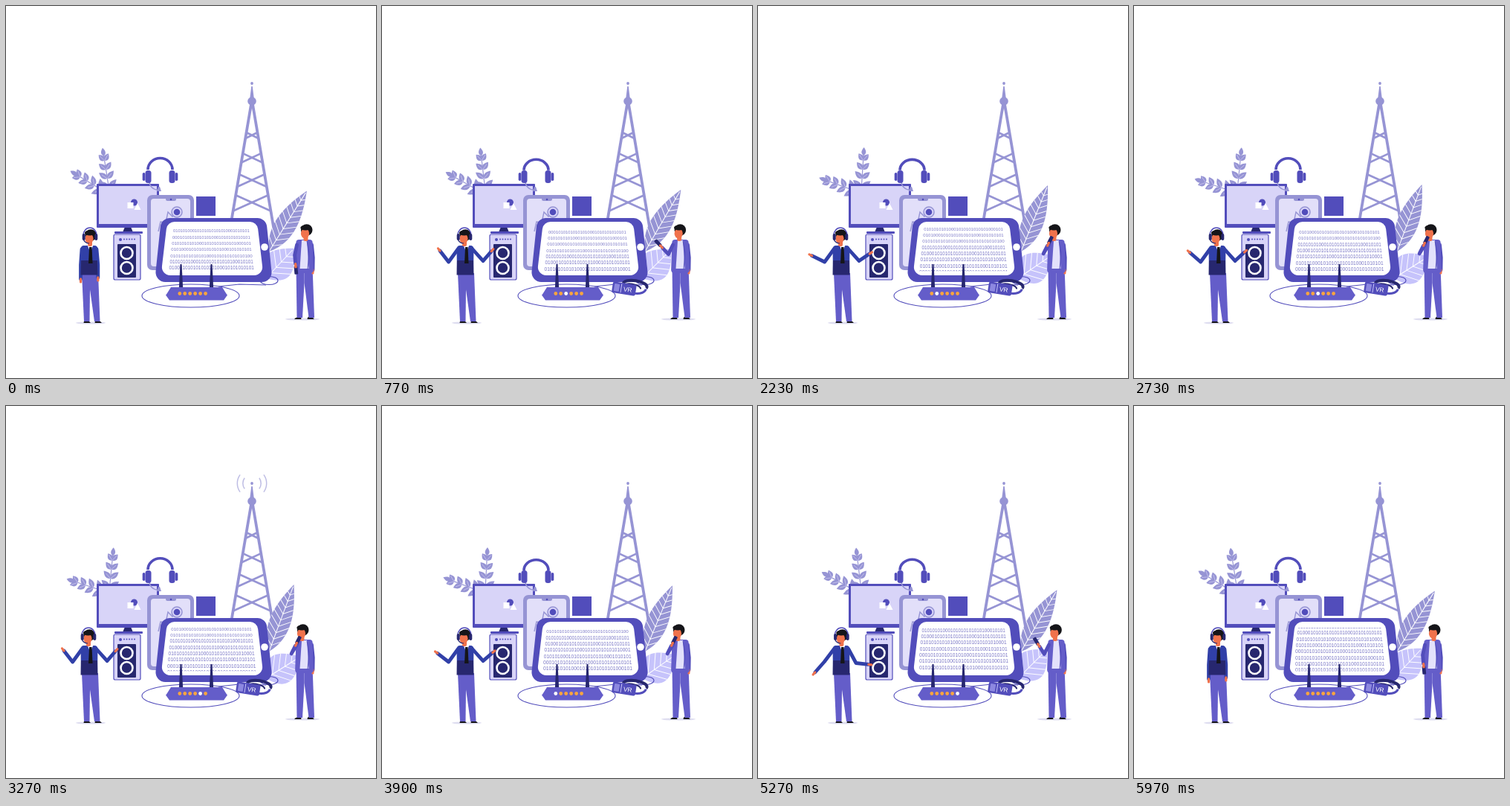
An HTML page with a canvas for the animation above (6.01 s loop, 498 by 500 pixels).

```html
<!DOCTYPE html>
<html lang="en">
<head>
<meta charset="utf-8">
<title>Devices</title>
<style>
html, body { margin: 0; width: 100%; height: 100%; overflow: hidden; background: #fff; }
canvas { display: block; }
</style>
</head>
<body>
<canvas id="stage" width="498" height="500"></canvas>
<script>
const ctx = document.getElementById('stage').getContext('2d');
const LOOP = 6010, TAU = Math.PI * 2, RAD = Math.PI / 180;
const C = {
  main: '#524dbb', mid: '#9694d4', soft: '#d8d4f8', pale: '#c6c3fb', navy: '#27276f',
  suit: '#645dc9', blue: '#3140a8', skin: '#f0724c', hair: '#151519', lamp: '#f9a53f', white: '#fff'
};

// ---- drawing helpers
function paint(fill, stroke, width = 1) {
  if (fill) { ctx.fillStyle = fill; ctx.fill(); }
  if (stroke) { ctx.strokeStyle = stroke; ctx.lineWidth = width; ctx.stroke(); }
}
function poly(pts, fill, stroke, width, open) {
  ctx.beginPath();
  pts.forEach(([x, y], i) => i ? ctx.lineTo(x, y) : ctx.moveTo(x, y));
  if (!open) ctx.closePath();
  paint(fill, stroke, width);
}
const line = (pts, color, width) => poly(pts, null, color, width, true);
// upright shape, w1 wide at y1 and w2 wide at y2
const taperPts = (x, y1, w1, y2, w2) =>
  [[x - w1 / 2, y1], [x + w1 / 2, y1], [x + w2 / 2, y2], [x - w2 / 2, y2]];
const taper = (x, y1, w1, y2, w2, fill) => poly(taperPts(x, y1, w1, y2, w2), fill);
function oval(x, y, rx, ry, fill, stroke, width) {
  ctx.beginPath();
  ctx.ellipse(x, y, rx, ry, 0, 0, TAU);
  paint(fill, stroke, width);
}
const dot = (x, y, r, fill, stroke, width) => oval(x, y, r, r, fill, stroke, width);
function arc(x, y, rx, ry, a, b, color, width) {
  ctx.beginPath();
  ctx.ellipse(x, y, rx, ry, 0, a, b);
  paint(null, color, width);
}
function box(x, y, w, h, r, fill, stroke, width) {
  ctx.beginPath();
  ctx.roundRect(x, y, w, h, r);
  paint(fill, stroke, width);
}
function roundPoly(pts, r, fill) {
  const n = pts.length, last = pts[n - 1];
  ctx.beginPath();
  ctx.moveTo((last[0] + pts[0][0]) / 2, (last[1] + pts[0][1]) / 2);
  pts.forEach((p, i) => {
    const q = pts[(i + 1) % n];
    ctx.arcTo(p[0], p[1], q[0], q[1], r);
  });
  ctx.closePath();
  paint(fill);
}
function at(x, y, deg, draw, scale = 1) {
  ctx.save();
  ctx.translate(x, y);
  ctx.rotate(deg * RAD);
  ctx.scale(scale, scale);
  draw();
  ctx.restore();
}

// ---- timing helpers
const clamp = v => Math.min(1, Math.max(0, v));
const ease = (t, from, to) => (1 - Math.cos(Math.PI * clamp((t - from) / (to - from)))) / 2;
const raised = (t, up, top, down, rest) => ease(t, up, top) - ease(t, down, rest);

// ---- plants
function blade(len, half, color, step) {
  ctx.beginPath();
  ctx.moveTo(0, 0);
  ctx.bezierCurveTo(-half * 1.6, -len * 0.3, -half, -len * 0.65, 0, -len);
  ctx.bezierCurveTo(half, -len * 0.65, half * 1.6, -len * 0.3, 0, 0);
  paint(color);
  if (!step) return;
  ctx.save();
  ctx.clip();
  line([[0, 0], [0, 3 - len]], C.white, 1);
  for (let y = step; y < len - step; y += step)
    line([[-half * 1.1, -y - half * 0.9], [0, -y], [half * 1.1, -y - half * 0.9]], C.white, 0.9);
  ctx.restore();
}
function branch(x, y, deg, len) {
  at(x, y, deg, () => {
    line([[0, 0], [0, 6 - len]], C.mid, 1.2);
    for (let i = 0; i < 4; i++)
      for (const s of [-1, 1])
        at(0, -4 - i * len * 0.21, s * (52 - i * 5), () => {
          blade(15 - i * 1.3, 3.6, C.mid);
          line([[0, 0], [0, -9]], C.soft, 0.6);
        });
    at(0, 11 - len, 0, () => blade(11, 3, C.mid));
  });
}

// ---- devices
function tower() {
  const reach = y => (y - 132) * 0.17 + 1;
  taper(331, 108, 1.5, 126, 6, C.mid);
  dot(331, 104, 1.9, C.mid);
  dot(331, 128, 5.8, C.mid);
  for (const s of [-1, 1]) {
    line([[331 + s, 132], [331 + s * reach(300), 300]], C.mid, 3.8);
    for (let k = 0; k < 4; k++) {
      const y = 174 + 30.3 * k, h = 4 + 2.2 * k;
      line([[331 - s * reach(y - h), y - h], [331 + s * reach(y + h), y + h]], C.mid, 2.6);
    }
  }
}
function signal(t) {
  const p = (t % (LOOP / 4)) / 700;
  const r = 32 * (1 - (1 - p) ** 2);
  if (p >= 1 || r < 3) return;
  ctx.globalAlpha = 1 - p;
  for (const k of [0.62, 1])
    for (const mid of [0, Math.PI])
      arc(331, 104, r * k, r * k, mid - 0.63, mid + 0.63, C.mid, 1.5);
  ctx.globalAlpha = 1;
}
function headphones(t) {
  const dy = 1.75 * (1 - Math.cos(2 * TAU * t / LOOP));
  arc(204, 236, 11, 11, Math.PI / 2, Math.PI, C.mid, 1.5);
  taper(206, 243, 2, 249, 6, C.mid);
  arc(207.5, 220 + dy * 0.4, 16.5, 15.5 - dy * 0.6, Math.PI, TAU, C.main, 3.6);
  for (const s of [-1, 1]) {
    const x = 207.5 + s * 16;
    box(x - 4, 221, 8, 17, 3.5, C.main);
    box(x + s * 6 - 1.8, 224, 3.6, 11, 1.8, C.main);
  }
}
function monitor() {
  taper(164, 297, 8, 304, 14, C.navy);
  box(146, 303, 38, 3, 1, C.main);
  box(122, 239, 84, 59, 1, C.main);
  box(125, 242, 78, 51, 0, C.soft);
  dot(172.5, 264, 4.5, C.main);
  box(163.5, 264, 8, 8, 0, C.white);
  taper(177, 265, 0, 274, 9, C.white);
}
function speaker() {
  box(145, 307, 36, 61, 2, C.soft, C.main, 1.2);
  dot(154, 314, 2, C.main);
  for (let x = 159; x < 175; x += 3.5) dot(x, 313.5, 1, C.main);
  box(150, 320, 25, 45, 1, C.navy);
  for (const y of [332, 352]) dot(162.5, y, 8, C.navy, C.white, 2.6);
}
function slimPhone() {
  box(190, 254, 63, 101, 7, C.mid);
  box(195, 259, 53, 91, 4, '#e2dff9');
  box(215, 257, 14, 5, 3, C.mid);
  dot(222, 260, 1.3, C.main);
  line([[205, 303], [208, 290], [215, 291], [218, 277], [224, 283], [230, 277]], C.mid, 1.4);
  dot(230, 277, 7, C.soft, C.mid, 1.5);
  dot(230, 277, 4.3, C.main);
}
const bits = '0101010001010101'.repeat(4);
function tablet(t) {
  roundPoly(taperPts(279.5, 285, 141, 371, 159), 13, C.main);
  roundPoly(taperPts(277.5, 290, 121, 362, 138), 11, C.white);
  dot(348, 324, 4.8, C.white);
  const s = t / 1000, scroll = 9 * s - 0.19 * s * s;
  ctx.save();
  ctx.beginPath();
  ctx.rect(214, 298, 128, 58.5);
  ctx.clip();
  ctx.fillStyle = '#7a77c6';
  ctx.textBaseline = 'middle';
  ctx.textAlign = 'left';
  for (let k = 0; k < 14; k++) {
    const u = k * 8.3;
    const x = Math.max(217, 225 - u * 0.11), end = Math.min(337.5, 328 + u * 0.12);
    ctx.font = (end - x) / 17.8 + 'px "Liberation Sans", Arial, sans-serif';
    ctx.fillText(bits.substr(k * 6 % 16, 32), x, 302.6 + u - scroll);
  }
  ctx.restore();
}
function cable() {
  oval(248.5, 389.5, 65.5, 15.5, null, C.main, 1.1);
  line([[286, 377], [314, 374], [350, 375]], C.main, 1.1);
  oval(354, 369, 12, 5.5, null, C.main, 1.1);
}
function router(t) {
  for (const x of [235.5, 276.5]) taper(x, 347, 2, 378, 5.2, C.navy);
  taper(256.5, 378, 69, 389, 83, C.suit);
  taper(256.5, 388.5, 83, 395.5, 73, C.suit);
  const lit = t > 60 && t < 5508 ? Math.floor(t / 306) % 6 : -1;
  for (let i = 0; i < 6; i++) dot(233.8 + i * 6.95, 386.5, 2.4, i === lit ? C.white : C.lamp);
}
function headset(t) {
  if (t < 25) return;
  at(326, 379, 9, () => {
    arc(14, -6, 16, 6, Math.PI, TAU + 0.3, C.navy, 4);
    arc(14, -3, 15, 8, 0, Math.PI / 2, C.main, 3);
    arc(10, -2, 12, 5, Math.PI, TAU, C.navy, 2);
    box(-16, -6.5, 32, 15, 2.5, C.main);
    box(-13.5, -4, 7, 10, 1, '#8d88e0');
    line([[-4, -5], [-4, 7]], C.pale, 1);
    ctx.fillStyle = C.white;
    ctx.font = '8.5px "Liberation Sans", Arial, sans-serif';
    ctx.textAlign = 'center';
    ctx.textBaseline = 'middle';
    ctx.fillText('VR', 5, 2);
  }, ease(t, -300, 300));
}

// ---- people
// arm angles run from straight down, outward positive; side -1 is the viewer's left
function arm(x, y, side, up, low, lenUp, lenLow, color) {
  const step = (p, deg, len) => [p[0] + side * Math.sin(deg * RAD) * len, p[1] + Math.cos(deg * RAD) * len];
  const elbow = step([x, y], up, lenUp), wrist = step(elbow, low, lenLow), hand = step(wrist, low, 4);
  ctx.lineCap = ctx.lineJoin = 'round';
  line([[x, y], elbow, wrist], color, 4.8);
  line([wrist, hand], C.skin, 3.2);
  ctx.lineCap = 'butt';
  ctx.lineJoin = 'miter';
  return hand;
}
function head(x, y) {
  box(x - 3, y + 3, 6, 9, 2, C.skin);
  oval(x + 1.2, y - 3, 7.8, 7.8, C.hair);
  oval(x - 1, y + 1.8, 5.6, 6.8, C.skin);
  oval(x - 0.4, y - 6, 6.8, 3.6, C.hair);
}
function legs(x, top, bottom, stance) {
  const half = 11, foot = 7.5;
  for (const s of [-1, 1]) {
    const heel = s < 0 ? x - half + 3 - stance : x + half - 5;
    poly([[x, top], [x + s * half, top], [heel + foot * (s > 0), bottom],
      [heel + foot * (s < 0 ? 1 : 0) - (s > 0 ? 0 : 0), bottom], [heel + foot * (s < 0), bottom], [x, top + 22]], C.suit);
  }
}
function shoe(x, y, dir) {
  ctx.beginPath();
  ctx.moveTo(x - 3.5 * dir, y);
  ctx.quadraticCurveTo(x - 3 * dir, y - 5, x + dir, y - 3);
  ctx.quadraticCurveTo(x + 5 * dir, y - 2, x + 6 * dir, y);
  paint(C.hair);
}
function agent(t) {
  const up = raised(t, 60, 700, 4150, 5950), out = up ** 0.4;
  const wave = Math.cos(TAU * (t - 770) / 2500);
  oval(114, 426, 20, 1.6, '#deddf0');
  shoe(108, 426, 1);
  shoe(123, 426, 1);
  legs(113, 359, 424, 0);
  roundPoly(taperPts(112, 322, 23, 361, 22), 4, C.blue);
  arm(102, 327, -1, 4 + 32 * up + 28 * Math.sin(Math.PI * up), (128 + 14 * wave) * up, 21, 19, C.blue);
  arm(122, 327, 1, 5 + 37 * out, (131 + 8 * wave) * out, 21, 17, C.blue);
  taper(112, 342, 22, 361.5, 23, C.navy);
  taper(113.5, 320, 9, 330, 1, C.white);
  taper(113.8, 324, 3.5, 346, 5.5, C.hair);
  const x = 113 - 2 * up;
  head(x, 311);
  arc(x, 308, 9, 10, Math.PI, TAU, C.main, 1.5);
  for (const s of [-1, 1]) box(x + s * 8.3 - 2, 306, 4, 9, 2, C.navy);
  arc(x - 1, 313, 7.5, 6, Math.PI / 2, Math.PI, C.navy, 1.2);
}
function caller(t) {
  const up = raised(t, 100, 1200, 4900, 5950);
  oval(399, 421, 23, 1.6, '#deddf0');
  shoe(394, 421, -1);
  shoe(409, 421, 1);
  legs(401.5, 350, 419, 2);
  arm(411.5, 321, 1, 6, -1, 17, 17, C.main);
  roundPoly(taperPts(401.5, 314, 22, 359, 25), 4, C.suit);
  taper(401.5, 315, 7, 353, 12, '#e3e1fb');
  line([[405, 316], [408, 331], [406, 354]], C.main, 1);
  const fore = -5 + 212 * up;
  const [x, y] = arm(391.5, 321, -1, 12 + 20 * up, fore, 14, 12, C.main);
  head(403.5 - 5 * up, 304);
  at(x, y, fore, () => box(-2.4, -1, 4.8, 11, 1, C.navy));
  dot(x, y, 1.8, C.skin);
}

function draw(t) {
  const sway = Math.cos(TAU * t / LOOP);
  box(0, 0, 498, 500, 0, C.white);
  branch(132, 249, -65.5 + 6.5 * sway, 53);
  branch(139, 248, -1.5 - 7.5 * sway, 58);
  tower();
  signal(t);
  monitor();
  headphones(t);
  speaker();
  slimPhone();
  box(256, 256, 26, 26, 0, C.main);
  at(354, 330, 26.1 + 5.9 * sway, () => blade(96, 14.5, C.mid, 9));
  at(350, 366, 50.5 - 7.5 * sway, () => blade(55, 21, C.pale, 10));
  cable();
  tablet(t);
  router(t);
  headset(t);
  agent(t);
  caller(t);
}

const start = performance.now();
function tick(now) {
  draw(Math.max(0, now - start) % LOOP);
  requestAnimationFrame(tick);
}
draw(0);
requestAnimationFrame(tick);
</script>
</body>
</html>
```
